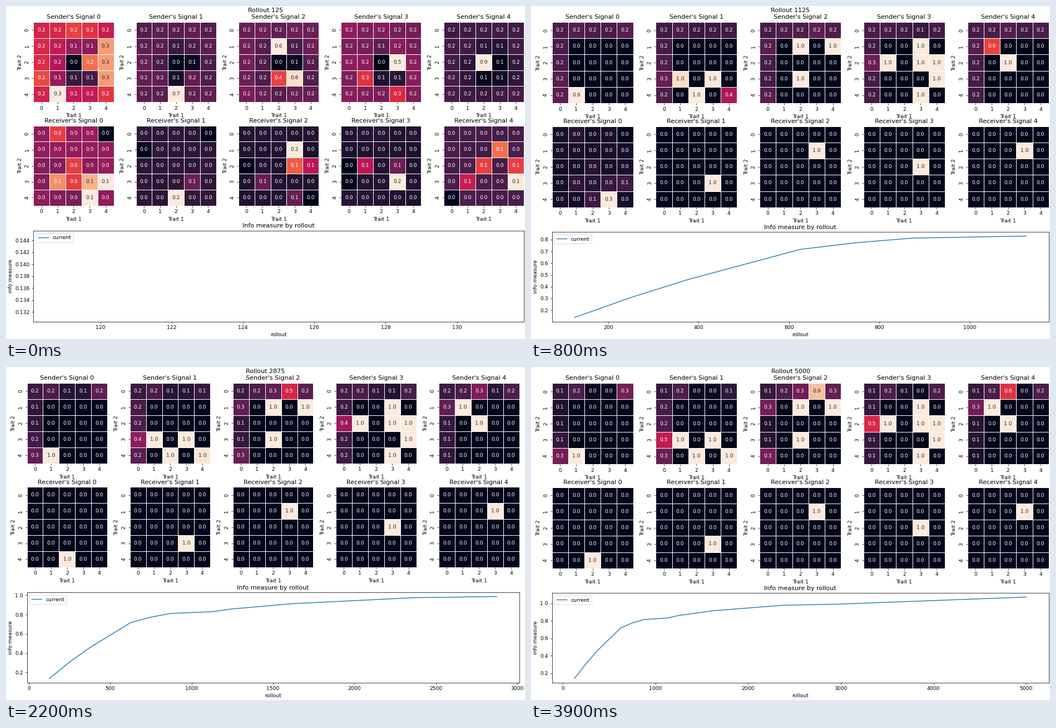
Animation, 933 px wide and 600 px high, one loop 4 s. Source, as a matplotlib script:

```python
import numpy as np
import matplotlib.pyplot as plt
from matplotlib.animation import FuncAnimation
from matplotlib.colors import LinearSegmentedColormap

W, H, DPI = 933, 600, 64
FRAMES, INTERVAL, STEP = 40, 100, 125
S = 25 / 24  # scale of all point sizes

plt.rcParams.update({
    "font.family": "DejaVu Sans",
    "font.size": 10 * S,
    "axes.titlesize": "large",
    "figure.titlesize": "large",
    "axes.titlepad": 6 * S,
    "axes.labelpad": 4 * S,
    "axes.linewidth": .8 * S,
    "lines.linewidth": 1.5 * S,
})
for side in "xy":
    plt.rcParams[side + "tick.major.size"] = 3.5 * S
    plt.rcParams[side + "tick.major.pad"] = 3.5 * S
    plt.rcParams[side + "tick.major.width"] = .8 * S

ROCKET = LinearSegmentedColormap.from_list("rocket", [
    "#03051a", "#221331", "#451c47", "#691f55", "#921c5b", "#b91657",
    "#d92847", "#ed503e", "#f47d57", "#f6a47c", "#f7c9aa", "#faebdd"])

rng = np.random.default_rng(4)
frames = np.arange(FRAMES)
t = frames[:, None, None]
row, col = np.mgrid[:5, :5]

rollouts = STEP * (frames + 1)
info = np.interp(
    rollouts,
    [125, 250, 375, 625, 750, 875, 1125, 1250, 1625, 2375, 3000, 3750, 5000],
    [.138, .308, .459, .717, .774, .813, .83, .859, .914, .976, .99, 1.02, 1.07])


def rise(start, mid, end=1, steep=3.5):
    """Logistic path over all frames that is half way at frame mid."""
    s = 1 / (1 + np.exp(-steep * (frames / mid - 1)))
    return start + (end - start) * (s - s[0]) / (1 - s[0])


def at(cell):
    """Index of a cell written as row * 10 + column, over all frames."""
    return (slice(None), *divmod(cell, 10))


def sender(chosen, drift, hints={}):
    """Chosen cells rise, the first row and column drift, the rest fade."""
    base = rng.normal(.195, .01, (5, 5))
    outer = (row == 0) | (col == 0)
    dist = np.hypot(row - 2.3, col - 2.4)
    start = np.where(outer, base, base * (1 - np.exp(-dist**2 / 1.4)))
    for cell, value in hints.items():
        start[divmod(cell, 10)] = value
    final = np.where(col == 0, .14, .2)
    for cell, value in drift.items():
        final[divmod(cell, 10)] = value
    data = np.where(outer, start + (final - start) * t / (FRAMES - 1),
                    start * np.exp(-(t / (2 * dist))**2))
    for cell, path in chosen.items():
        data[at(cell)] = rise(*path)
    return data


def receiver(base, hints, winner, path, fade=1):
    """One cell wins, all others fade from a nearly even start."""
    start = base * rng.normal(1, .06, (5, 5))
    for cell, value in hints.items():
        start[divmod(cell, 10)] = value
    data = start * np.exp(-(t / fade)**2)
    data[at(winner)] = rise(*path)
    return data


# Chosen cells: (start, frame half way[, end]); drift: final values.
SENDERS = [
    sender({41: (.33, 5.5)},
           {2: .03, 3: .03, 4: .3, 10: .08, 20: .08, 40: .3},
           {14: .27, 23: .24, 24: .27, 34: .27}),
    sender({31: (.2, 4.2), 33: (.2, 1), 42: (.7, 1), 44: (.2, 10.5)},
           {2: .03, 3: .03, 4: .13, 10: .18, 20: .2, 30: .48, 40: .27}),
    sender({3: (.2, 23, .95), 12: (.62, 1), 14: (.2, 2), 32: (.39, 1)},
           {2: .3, 4: .26, 10: .3, 20: .08, 30: .1, 40: .3},
           {33: .6}),
    sender({13: (.2, 2.2), 21: (.2, 1.8), 23: (.52, 1), 24: (.2, 2.8),
            34: (.2, 2.8), 43: (.3, 1.9)},
           {2: .08, 3: .03, 20: .54},
           {31: .31}),
    sender({2: (.2, 34, .8), 11: (.2, 7.8), 22: (.9, 1)},
           {3: .04, 10: .3, 20: .1, 30: .1, 40: .07}),
]

RECEIVERS = [
    receiver(.029, {1: .049, 4: 0, 22: .049, 31: .063, 32: .049, 33: .07,
                    34: .082, 43: .06}, 42, (.025, 12.5, 1, 10), fade=12),
    receiver(.028, {4: 0, 10: 0, 33: .062, 42: .23}, 33, (.062, 1)),
    receiver(.018, {20: 0, 23: .132, 24: .092, 31: .053, 43: .053, 44: 0},
             13, (.2, 1)),
    receiver(.018, {20: 0, 21: .092, 30: 0, 33: .2}, 23, (.055, 1)),
    receiver(.021, {22: .066, 24: .066, 31: .054, 34: .11, 40: 0},
             13, (.077, 1)),
]
# The first receiver briefly favours another cell before it settles.
RECEIVERS[0][at(43)] += .28 * np.exp(-((frames - 8) / 5)**2)


def luminance(rgb):
    lin = np.where(rgb <= .03928, rgb / 12.92, ((rgb + .055) / 1.055)**2.4)
    return lin @ [.2126, .7152, .0722]


def place(ax, x, y, w, h):
    """Position axes by pixels from the top left corner."""
    ax.set_position([x / W, 1 - (y + h) / H, w / W, h / H])


class Heatmap:
    def __init__(self, title, data):
        self.data = data
        self.ax = ax = fig.add_axes([0, 0, .1, .1], label=title)
        self.mesh = ax.pcolormesh(data[0], cmap=ROCKET, edgecolors="white",
                                  linewidth=.8)
        self.texts = [ax.text(c + .5, r + .5, "", ha="center", va="center")
                      for r in range(5) for c in range(5)]
        ax.set(title=title, xlim=(0, 5), ylim=(5, 0))
        ax.set_xlabel("Trait 1", labelpad=5 * S)
        ax.set_ylabel("Trait 2")
        ax.set_xticks(np.arange(5) + .5, range(5))
        ax.set_yticks(np.arange(5) + .5, range(5), rotation="vertical",
                      va="center")
        ax.spines[:].set_visible(False)

    def show(self, i):
        values = self.data[i]
        self.mesh.set_array(values)
        self.mesh.set_clim(values.min(), values.max())
        light = luminance(self.mesh.to_rgba(values)[..., :3])
        for text, value, lum in zip(self.texts, values.flat, light.flat):
            text.set_text(f"{value:.1f}")
            text.set_color(".15" if lum > .408 else "white")


fig = plt.figure(figsize=(W / DPI, H / DPI), dpi=DPI)
heading = fig.suptitle("", x=.5, y=1 - 2.8 / H, va="top")
heatmaps = [[Heatmap(f"{who}'s Signal {n}", data)
             for n, data in enumerate(group)]
            for who, group in (("Sender", SENDERS), ("Receiver", RECEIVERS))]
chart = fig.add_axes([.05, .05, .9, .27])
line, = chart.plot([], [], label="current")
chart.set(title="Info measure by rollout", xlabel="rollout",
          ylabel="info measure")
chart.legend(loc="upper left")

DIGIT, RIGHT, BOTTOM = 5.9, 930.8, 568.6


def visible_labels(axis):
    lo, hi = axis.get_view_interval()
    ticks = [v for v in axis.get_majorticklocs() if lo <= v <= hi]
    return ticks, axis.get_major_formatter().format_ticks(ticks)


def arrange():
    """Fit all axes around the tick labels of the line chart."""
    place(chart, 40, 407, 890, BOTTOM - 407)
    _, labels = visible_labels(chart.yaxis)
    left = 37.5 + DIGIT * (max(map(len, labels)) - 3)
    ticks, labels = visible_labels(chart.xaxis)
    x0, x1 = chart.get_xlim()
    share = (ticks[-1] - x0) / (x1 - x0)
    half = DIGIT * len(labels[-1]) / 2
    width = min(RIGHT - left, (RIGHT - half - left) / share)

    size = .1636 * width
    pitch = (width - size) / 4
    sink = min(size - 144.25, 1)
    for group, top in zip(heatmaps, (29, 215.6 + sink)):
        for n, heat in enumerate(group):
            place(heat.ax, left + n * pitch, top, size, size)
    top = 405 + 2.2 * sink
    place(chart, left, top, width, BOTTOM - top)


def update(i):
    heading.set_text(f"Rollout {rollouts[i]}")
    for group in heatmaps:
        for heat in group:
            heat.show(i)
    line.set_data(rollouts[:i + 1], info[:i + 1])
    chart.relim()
    chart.autoscale_view()
    arrange()
    return []


anim = FuncAnimation(fig, update, frames=FRAMES, interval=INTERVAL,
                     repeat=True, repeat_delay=0)
plt.show()
```
